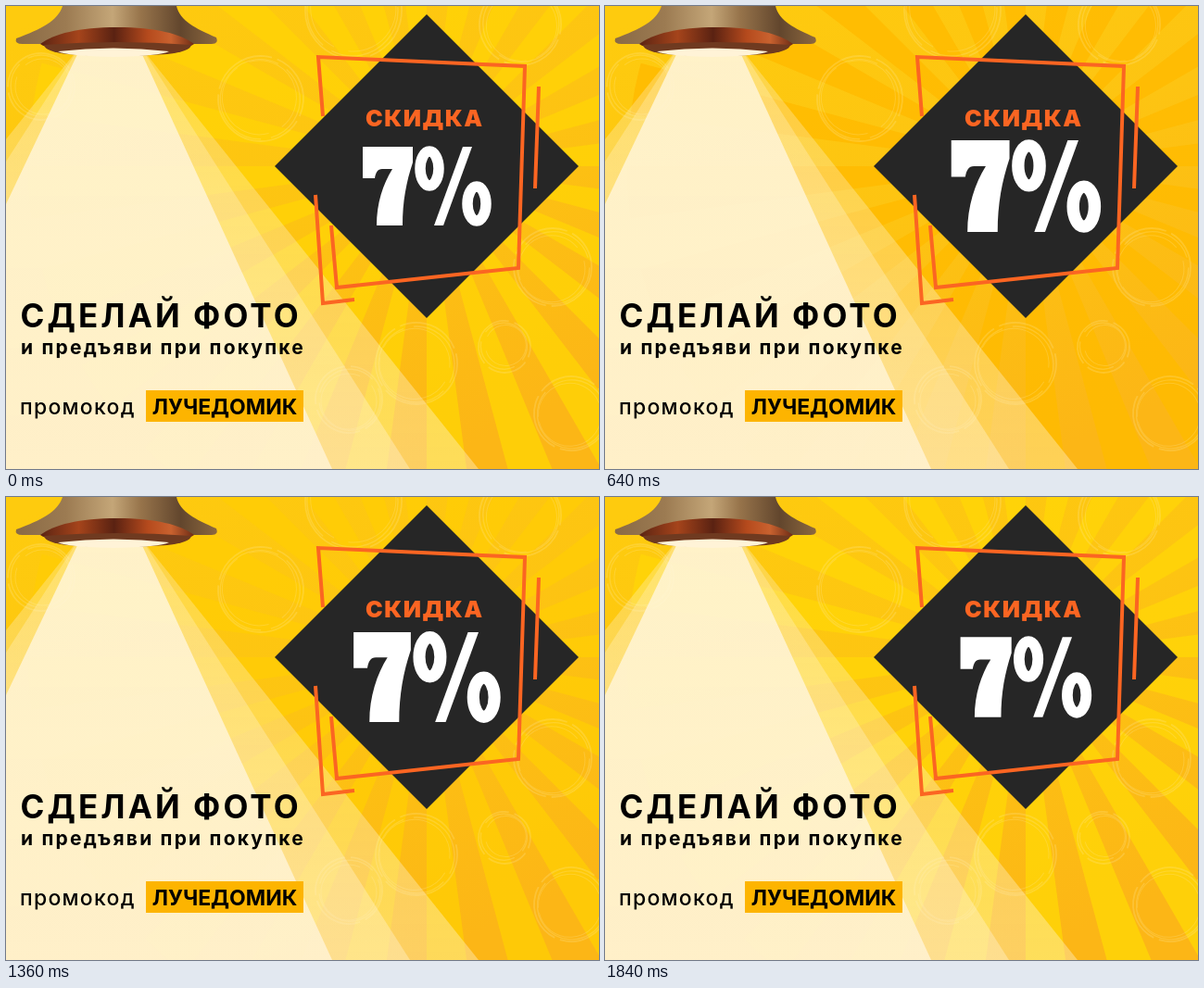
Recreate the animation shown at these times as an HTML page. Size 640 by 500 pixels, loop 1920 ms.

```html
<!DOCTYPE html>
<html lang="ru">
<head>
<meta charset="utf-8">
<title>Скидка 7%</title>
<style>
html, body { margin: 0; width: 100%; height: 100%; overflow: hidden; background: #fdc20f; }
svg { display: block; width: 640px; height: 500px; }
text { font-family: Montserrat, Inter, "Open Sans", sans-serif; font-weight: 700; }
.frame { fill: none; stroke: #fb6522; stroke-width: 4; }
</style>
</head>
<body>
<svg viewBox="0 0 640 500">
  <defs>
    <linearGradient id="sky" x1=".1" y1="0" x2=".7" y2="1">
      <stop stop-color="#fecb0e"/><stop offset=".5" stop-color="#fdc412"/><stop offset="1" stop-color="#fcb616"/>
    </linearGradient>
    <linearGradient id="beam" x1="0" y1="0" x2="0" y2="1">
      <stop stop-color="#fff3cc" stop-opacity=".3"/><stop offset="1" stop-color="#fff2cc" stop-opacity=".42"/>
    </linearGradient>
    <linearGradient id="core" x1="0" y1="0" x2="0" y2="1">
      <stop stop-color="#fff5d8" stop-opacity=".85"/><stop offset="1" stop-color="#fff2d3" stop-opacity=".85"/>
    </linearGradient>
    <linearGradient id="brass">
      <stop stop-color="#8a6a45"/><stop offset=".25" stop-color="#9c7b52"/><stop offset=".48" stop-color="#c4a678"/>
      <stop offset=".62" stop-color="#97744b"/><stop offset=".82" stop-color="#62462d"/><stop offset="1" stop-color="#8c683f"/>
    </linearGradient>
    <linearGradient id="copper">
      <stop stop-color="#5b2413"/><stop offset=".25" stop-color="#a5441b"/><stop offset=".48" stop-color="#5a2212"/>
      <stop offset=".7" stop-color="#b54a1d"/><stop offset=".85" stop-color="#c9622f"/><stop offset="1" stop-color="#6d2c16"/>
    </linearGradient>
    <clipPath id="disc"><circle cx="454" cy="173" r="430"/></clipPath>
  </defs>

  <rect width="640" height="500" fill="url(#sky)"/>
  <g clip-path="url(#disc)"><path id="rays" opacity=".85" transform="translate(454 173)"/></g>
  <g id="rings" fill="none" stroke="#ffeaa0" opacity=".24"/>

  <!-- light beams, widest first -->
  <path d="M79 45H146L510 500H0V144Z" fill="url(#beam)"/>
  <path d="M79 45H146L436 500H0V168Z" fill="url(#beam)"/>
  <path d="M79 48H145L352 500H0V214Z" fill="url(#core)"/>

  <!-- lamp -->
  <path d="M61 0H184C188 16 204 24 227 34Q230 41 222 41H18Q9 41 11 35C38 25 56 16 61 0Z" fill="url(#brass)"/>
  <path d="M37 41C52 30 78 23 120 23S188 30 203 41Q196 48 120 48T37 41Z" fill="url(#copper)"/>
  <path d="M41 42Q120 36 200 42Q199 49 174 52Q120 56 66 52Q42 49 41 42Z" fill="#6f3a20"/>
  <path d="M56 49Q116 42 176 49Q166 54 116 55Q66 54 56 49Z" fill="#fff3d7"/>

  <!-- discount badge -->
  <path d="M454 9L618 173L454 337L290 173Z" fill="#262626"/>
  <path class="frame" d="M342 119L337 55L560 65L553 283L357 304L351 237M334 204L342 321L376 317M575 87L571 197"/>
  <text x="388" y="129.5" font-size="25" letter-spacing="1.5" fill="#fb6522" style="font-weight:900">СКИДКА</text>
  <g id="value" fill="#fff" role="img">
    <title>7%</title>
    <path d="M385 151H439V168C432 189 428 210 428 236H400C400 212 407 191 417 175H406C401 175 399 179 398 185H385Z"/>
    <path d="M493 151H503L472 236H462Z"/>
    <g fill="none" stroke="#fff" stroke-width="11.5">
      <ellipse cx="457" cy="174.5" rx="10" ry="18.5"/>
      <ellipse cx="508" cy="212.5" rx="10" ry="18.5"/>
    </g>
  </g>

  <!-- captions -->
  <text x="15.5" y="347" font-size="35" letter-spacing="3.1">СДЕЛАЙ ФОТО</text>
  <text x="16" y="376" font-size="21" letter-spacing="2.2">и предъяви при покупке</text>
  <text x="15" y="441" font-size="23" letter-spacing="1.25" style="font-weight:500">промокод</text>
  <rect x="151" y="415" width="170" height="34" fill="#fdb400"/>
  <text x="236" y="441" font-size="23" text-anchor="middle">ЛУЧЕДОМИК</text>
</svg>
<script>
const LOOP = 1920, STEP = 80, RAYS = 24;
const $ = id => document.getElementById(id);
const mix = (a, b, k) => `rgb(${a.map((v, i) => Math.round(v + (b[i] - v) * k))})`;

// Evenly spaced wedges, each filling the second half of its sector.
const sector = 2 * Math.PI / RAYS;
const point = a => `${(600 * Math.cos(a)).toFixed(1)} ${(600 * Math.sin(a)).toFixed(1)}`;
let wedges = "";
for (let i = 0; i < RAYS; i++) wedges += `M0 0L${point((i + .5) * sector)}L${point((i + 1) * sector)}Z`;
$("rays").setAttribute("d", wedges);

// Brushed rings: a few broken strokes of slightly different radius.
const rings = [[590, 282, 42], [443, 386, 44], [275, 100, 46], [375, 5, 52], [538, 368, 28],
               [38, 87, 36], [555, 20, 44], [370, 425, 36], [610, 440, 40]];
$("rings").innerHTML = rings.map(([x, y, r], n) => [0, 3, 6].map((gap, i) =>
  `<circle cx="${x + i * .8}" cy="${y - i * .6}" r="${r - gap}" stroke-width="${1.8 - i * .4}"
    stroke-dasharray="${r * (1.6 + i * .4)} ${6 + i * 5}" transform="rotate(${n * 47 + i * 80} ${x} ${y})"/>`
).join("")).join("");

const start = performance.now();

function draw() {
  const t = Math.floor((performance.now() - start) % LOOP / STEP) * STEP;

  const grow = 1 - Math.abs(1 - t / (LOOP / 2));
  $("value").setAttribute("transform", `translate(454 194.5) scale(${1 + .245 * grow}) translate(-454 -193.5)`);

  const glow = (1 + Math.cos(2 * Math.PI * (t - 1730) / LOOP)) / 2;
  $("rays").setAttribute("fill", mix([255, 186, 0], [255, 214, 8], glow));

  requestAnimationFrame(draw);
}
draw();
</script>
</body>
</html>
```
